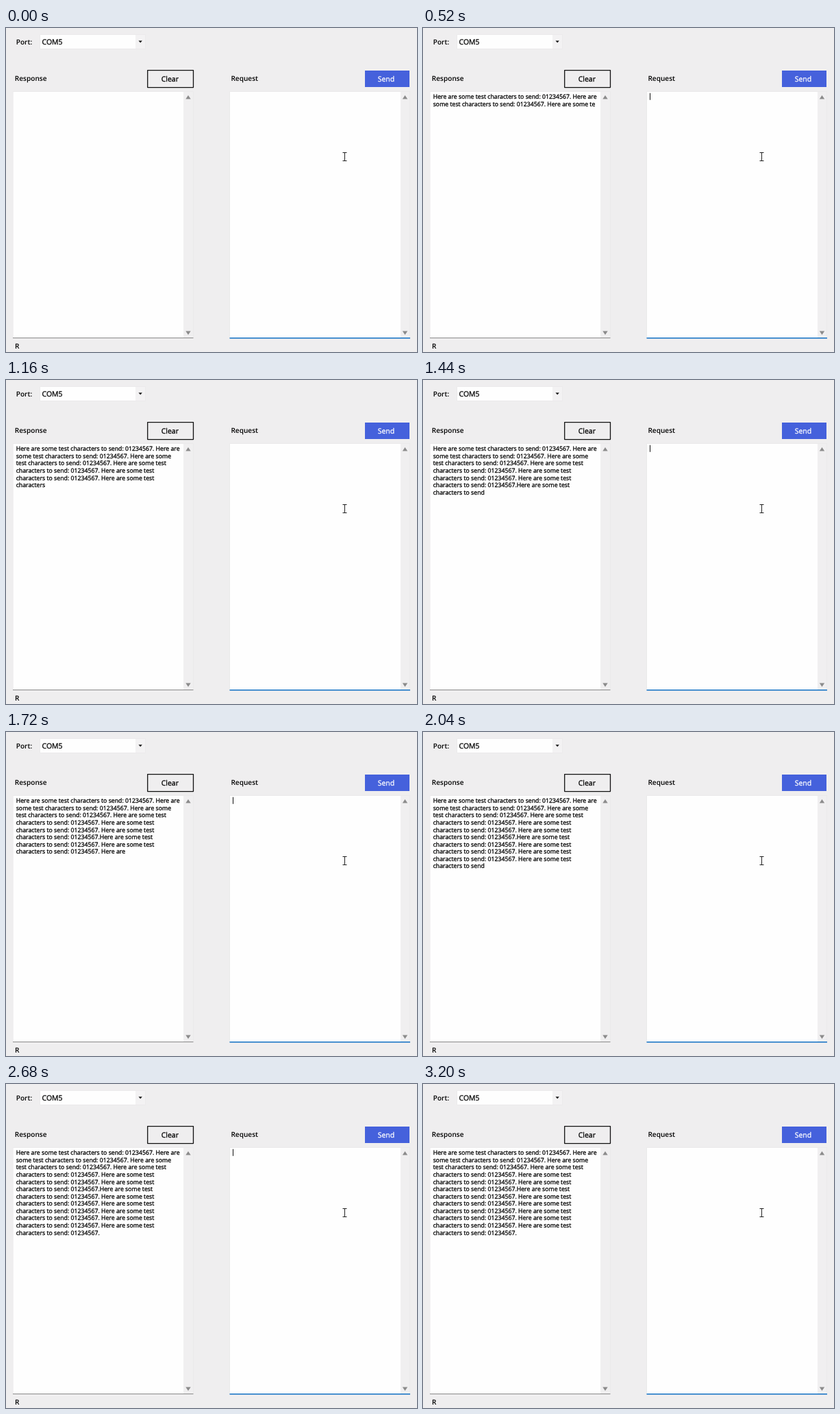
Write an HTML page with a canvas that moves like this. It is 600 px wide and 472 px high and loops after 3.24 s.

```html
<!DOCTYPE html>
<html lang="en">
<head>
<meta charset="utf-8">
<title>Serial terminal</title>
<style>
  html, body { margin: 0; width: 100%; height: 100%; overflow: hidden; background: #efeeef; }
  canvas { display: block; }
</style>
</head>
<body>
<canvas id="stage" width="600" height="472"></canvas>
<script>
const ctx = document.getElementById('stage').getContext('2d');
const LOOP = 3240, STEP = 40;
const FACE = '"Open Sans", "Noto Sans", sans-serif';
const BODY = `400 8.74px ${FACE}`;
const LABEL = `600 10.1px ${FACE}`;
const CONTROL = `400 10.5px ${FACE}`;
const SENTENCE = 'Here are some test characters to send: 01234567.';
const BATCH = Array(6).fill(SENTENCE).join(' ');
const MESSAGE = BATCH + BATCH;
const LINE_WIDTH = 241.5, LINE_HEIGHT = 10.57;
const clamp = (v, lo, hi) => Math.min(hi, Math.max(lo, v));

function rect(x, y, w, h, color) {
  ctx.fillStyle = color;
  ctx.fillRect(x, y, w, h);
}

// A hairline stroke gives the sturdy strokes of hinted screen text.
function text(str, x, y, font, color = '#000', weight = 0.3) {
  ctx.font = font;
  ctx.fillStyle = ctx.strokeStyle = color;
  ctx.fillText(str, x, y);
  if (weight) {
    ctx.lineWidth = weight;
    ctx.strokeText(str, x, y);
  }
}

function triangle(x, y, halfWidth, height, color) {
  ctx.fillStyle = color;
  ctx.beginPath();
  ctx.moveTo(x - halfWidth, y);
  ctx.lineTo(x + halfWidth, y);
  ctx.lineTo(x, y + height);
  ctx.fill();
}

function textArea(x, lineColor, lineHeight) {
  rect(x - 0.5, 92.5, 263.5, 359, '#e6e5e6');
  rect(x, 93, 249, 358, '#fefefe');
  rect(x + 249, 93, 13.5, 358, '#f0eff0');
  triangle(x + 255.5, 103.5, 3.7, -5.5, '#8b8b8b');
  triangle(x + 255.5, 441.5, 3.7, 5.5, '#8b8b8b');
  rect(x - 0.5, 451, 263.5, lineHeight, lineColor);
}

// Lines break again as each word grows past the edge.
function wrap(str) {
  ctx.font = BODY;
  const lines = [];
  let line = '';
  for (const word of str.split(' ')) {
    const next = line ? line + ' ' + word : word;
    if (line && ctx.measureText(next).width > LINE_WIDTH) {
      lines.push(line);
      line = word;
    } else {
      line = next;
    }
  }
  return [...lines, line];
}

function received(t) {
  const first = clamp((t - 64) * 0.25, 0, BATCH.length);
  const second = clamp((t - 1288) * 0.2453, 0, BATCH.length);
  return t < 80 ? 0 : Math.round(first + second);
}

function pointer(x, y) {
  ctx.strokeStyle = '#222';
  ctx.lineWidth = 1;
  ctx.beginPath();
  ctx.moveTo(x - 3, y - 6);
  ctx.lineTo(x + 3, y - 6);
  ctx.moveTo(x, y - 6);
  ctx.lineTo(x, y + 6);
  ctx.moveTo(x - 3, y + 6);
  ctx.lineTo(x + 3, y + 6);
  ctx.stroke();
}

function controls() {
  text('Port:', 14.7, 23.5, LABEL, '#000', 0);
  rect(49.5, 9.5, 154, 21, '#e7e6e7');
  rect(50, 10, 139.5, 20, '#fefefe');
  rect(189.5, 10, 13.5, 20, '#f3f2f3');
  triangle(196.2, 18.6, 2.7, 2.8, '#111');
  text('COM5', 52.5, 23.7, CONTROL);

  text('Response', 12.8, 77.3, LABEL, '#000', 0);
  ctx.strokeStyle = '#111';
  ctx.lineWidth = 1.3;
  ctx.strokeRect(206.7, 61.6, 66.8, 25);
  text('Clear', 226.7, 78, CONTROL);

  text('Request', 328.4, 77.3, LABEL, '#000', 0);
  rect(524, 62, 65, 24, '#4561dc');
  text('Send', 542.7, 78, CONTROL, '#fff');

  textArea(10.5, '#8a8a8a', 1);
  textArea(327, '#0067c0', 1.4);
  text('R', 13, 466.6, LABEL, '#000', 0);
}

function draw(time) {
  const t = Math.floor(time / STEP) * STEP;
  rect(0, 0, 600, 472, '#efeeef');
  controls();
  wrap(MESSAGE.slice(0, received(t))).forEach((line, i) =>
    text(line, 14.7, 103.3 + i * LINE_HEIGHT, BODY));
  const caretOn = t >= 380 && (t - 380) % 1060 < 530;
  if (caretOn) rect(331, 94.8, 1, 10, '#111');
  pointer(494.5, 187.5);
}

ctx.textRendering = 'geometricPrecision';
ctx.lineJoin = 'round';
const start = performance.now();
function tick() {
  draw((performance.now() - start) % LOOP);
  requestAnimationFrame(tick);
}
tick();
</script>
</body>
</html>
```
